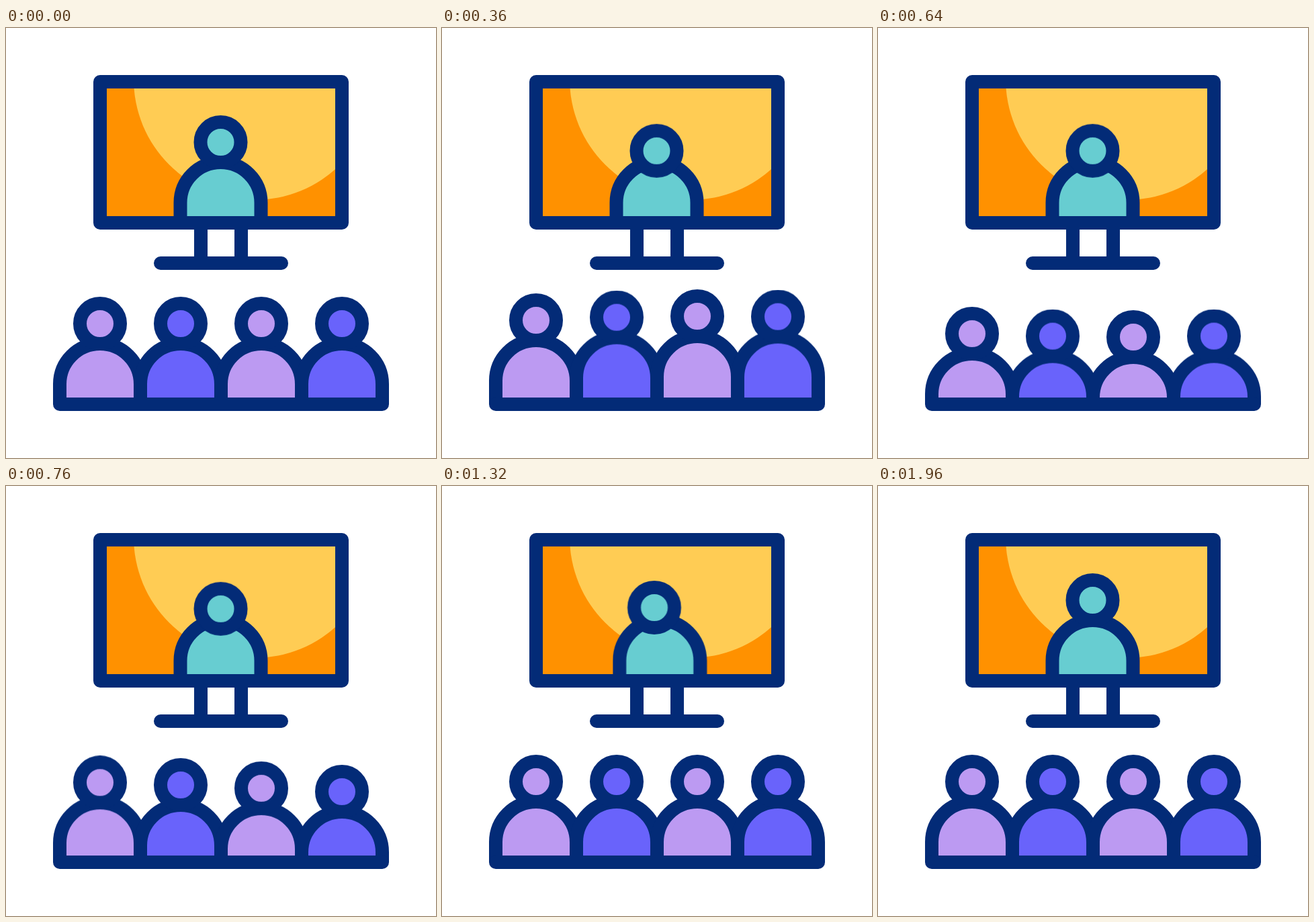
Recreate the animation shown at these times as an HTML page. Size 640 px wide and 640 px high, loop 2 s.

```html
<!DOCTYPE html>
<html lang="en">
<head>
<meta charset="utf-8">
<title>Lecture</title>
<style>
  html, body { margin: 0; width: 100%; height: 100%; overflow: hidden; background: #fff; }
  svg { display: block; width: 100vw; height: 100vh; }

  .line { stroke: #032b77; stroke-width: 20; stroke-linecap: round; stroke-linejoin: round; }
  .teal { fill: #67cdd1; }
  .lilac { fill: #bc9af2; }
  .blue { fill: #6963fb; }

  .bob, .slide, .lead, .nod {
    animation: 2s cubic-bezier(.364, 0, .636, 1) infinite;
  }
  .bob { animation-name: bob; animation-delay: calc(var(--i) * 40ms); }
  .slide { animation-name: slide; }
  .lead { animation-name: lead; }
  .nod { animation-name: nod; }

  /* audience: rise, sink, settle */
  @keyframes bob {
    0%, 40%, 100% { transform: translateY(0); }
    14% { transform: translateY(-11px); }
    28% { transform: translateY(20px); }
  }

  /* speaker: shoulders sway, the head turns slightly earlier */
  @keyframes slide {
    0%, 38%, 98%, 100% { transform: translateX(0); }
    46% { transform: translateX(25.5px); }
    58% { transform: translateX(-44px); }
    72% { transform: translateX(35px); }
    84.5% { transform: translateX(40px); }
  }
  @keyframes lead {
    0%, 38%, 98%, 100% { transform: translateX(0); }
    44% { transform: translateX(21px); }
    56% { transform: translateX(-46px); }
    72% { transform: translateX(15px); }
    84.5% { transform: translateX(40px); }
  }
  @keyframes nod {
    0%, 98%, 100% { transform: translateY(0); }
    12%, 38% { transform: translateY(12.8px); }
    50%, 84.5% { transform: translateY(11px); }
  }
</style>
</head>
<body>
<svg viewBox="0 0 640 640">
  <defs>
    <clipPath id="screen"><rect x="150" y="90" width="340" height="190"/></clipPath>
    <clipPath id="seats"><rect width="640" height="560"/></clipPath>
    <path id="torso" class="line" d="M-60 160V90a60 60 0 0 1 120 0V160"/>
    <circle id="head" class="line" r="30"/>
  </defs>

  <g clip-path="url(#screen)">
    <rect x="150" y="90" width="340" height="190" fill="#ff9100"/>
    <circle cx="370" cy="76" r="180" fill="#ffcc54"/>
    <g class="teal">
      <g class="slide"><use href="#torso" x="319.5" y="170"/></g>
      <g class="lead"><g class="nod"><use href="#head" x="319.5" y="170"/></g></g>
    </g>
  </g>
  <path class="line" fill="none" d="M140 80H500V290H140ZM290 290V350M350 290V350M230 350H410"/>

  <g clip-path="url(#seats)">
    <g class="bob lilac" style="--i:0"><use href="#torso" x="140" y="440"/><use href="#head" x="140" y="440"/></g>
    <g class="bob blue" style="--i:1"><use href="#torso" x="260" y="440"/><use href="#head" x="260" y="440"/></g>
    <g class="bob lilac" style="--i:2"><use href="#torso" x="380" y="440"/><use href="#head" x="380" y="440"/></g>
    <g class="bob blue" style="--i:3"><use href="#torso" x="500" y="440"/><use href="#head" x="500" y="440"/></g>
  </g>
  <path class="line" d="M80 560H560"/>
</svg>
</body>
</html>
```
